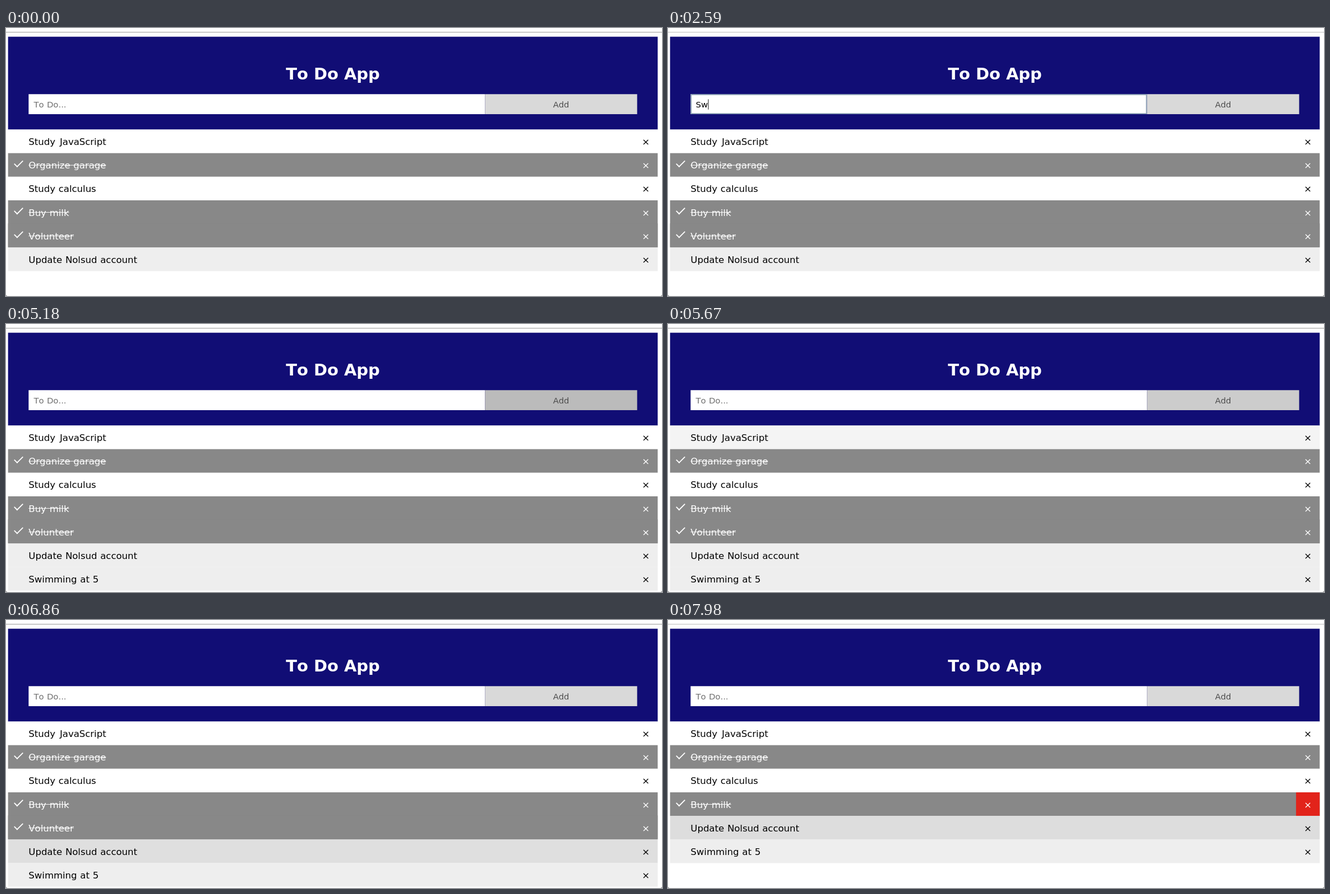
Animation of 1170 by 479 pixels, one loop 8 s. Source, as an HTML page:

```html
<!DOCTYPE html>
<html lang="en">
<head>
<meta charset="utf-8">
<title>To Do App</title>
<style>
  * { box-sizing: border-box; }
  html, body { margin: 0; width: 100%; height: 100%; overflow: hidden; background: #777; }
  #stage {
    position: relative; width: 1170px; height: 479px; overflow: hidden;
    background: #fff; border-radius: 0 0 3px 3px;
  }
  #rule { position: absolute; left: 0; top: 7px; width: 1170px; height: 1px; }
  /* the page is shown at 11/12 of its own size */
  #page {
    position: absolute; left: 0; top: 0; width: 1276px; height: 522px;
    transform: scale(.916667); transform-origin: 0 0;
    font: 18px "DejaVu Sans", Verdana, sans-serif;
    font-kerning: none; word-spacing: .034em; color: #000;
  }
  #page > *, #popup div { position: absolute; white-space: pre; }
  #head { left: 4px; top: 17px; width: 1264px; height: 181px; background: #110d75; }
  h1 {
    left: 4px; top: 67px; width: 1264px; margin: 0; word-spacing: 0;
    font-size: 31.6px; line-height: 44px; text-align: center; color: #fff;
  }
  #field, #add { top: 129px; height: 39px; font-size: 16.2px; line-height: 41px; }
  #field { left: 44px; width: 888px; padding-left: 10px; background: #fff; color: #707070; }
  #field.focus { box-shadow: inset 0 0 0 2px #8aa0b4; }
  #field.filled { color: #000; }
  #caret {
    display: none; position: absolute; top: 10px; width: 1px; height: 20px; background: #000;
  }
  .focus #caret { display: inline-block; }
  #add { left: 932px; width: 296px; font-size: 16px; text-align: center; color: #4d4d4d; }
  ul { left: 4px; top: 198px; width: 1264px; margin: 0; padding: 0; list-style: none; }
  li { position: relative; height: 46px; padding-left: 40px; line-height: 47px; }
  li i { font-style: normal; padding-left: .13em; }
  li.done { color: #fff; text-decoration: line-through; background: #888; }
  li.done + li.done { box-shadow: 0 -1px #888; }
  li.done::before {
    content: ""; position: absolute; left: 16px; top: 10px; width: 7px; height: 15px;
    border: solid #fff; border-width: 0 2px 2px 0; transform: rotate(45deg);
  }
  li b {
    position: absolute; right: 0; top: 0; width: 46px; height: 100%;
    font-weight: normal; text-align: center;
  }
  li b.hot { background: #e2231a; color: #fff; }
  #popup {
    left: 44px; top: 169px; width: 192px; height: 88px; background: #fff; border-radius: 3px;
    box-shadow: 0 1px 3px rgba(0, 0, 0, .4); font: 13px/22px Inter, sans-serif;
  }
  #popup div { left: 12px; }
</style>
</head>
<body>
<div id="stage">
  <div id="rule"></div>
  <div id="page">
    <div id="head"></div>
    <h1>To Do App</h1>
    <div id="field"><span id="typed"></span><span id="caret"></span></div>
    <div id="add">Add</div>
    <ul id="list"></ul>
    <div id="popup"><div style="top:15px">Blueee</div><div style="top:51px">scream</div></div>
  </div>
</div>
<script>
const LOOP = 8000, STEP = 70, FADE = 200;
const WHITE = 255, PALE = 238, HOVER = 221;
const FOCUS = 980, POPUP = 1260, SUBMIT = 5180, REMOVE = 7630, LEAVE = 7945;

const TEXT = 'Swimming at 5';
const KEYS = [2100, 2310, 2730, 2870, 3010, 3150, 3290, 3430, 3570, 3710, 3850, 4060, 4200];

// hover: spans under the pointer; hot: span over the close button
const items = [
  { text: 'Study <i>J</i>avaScript', base: WHITE, hover: [[5635, 5950]] },
  { text: 'Organize garage', done: true },
  { text: 'Study calculus', base: WHITE, hover: [[6370, 6580]] },
  { text: 'Buy milk', done: true, hot: [LEAVE, LOOP] },
  { text: 'Volunteer', done: true, hot: [7350, REMOVE], life: [0, REMOVE] },
  { text: 'Update Nolsud account', base: PALE, hover: [[6730, 7000], [REMOVE, LEAVE + 35]], hot: [REMOVE, LEAVE] },
  { text: TEXT, base: PALE, hover: [[7000, 7250]], life: [SUBMIT, LOOP] }
];

const $ = id => document.getElementById(id);
const within = (t, [a, b]) => t >= a && t < b;
const ease = ms => {
  const p = Math.min(1, Math.max(0, ms / FADE));
  return 1 - (1 - p) ** 2;
};
const level = (t, spans = []) =>
  spans.reduce((sum, [a, b]) => sum + ease(t - a) - ease(t - b), 0);
const grey = (from, to, k) => {
  const v = Math.round(from + (to - from) * k);
  return `rgb(${v},${v},${v})`;
};

for (const item of items) {
  item.row = document.createElement('li');
  item.row.innerHTML = item.text + '<b>×</b>';
  item.row.classList.toggle('done', !!item.done);
  item.close = item.row.querySelector('b');
  $('list').append(item.row);
}

function draw(t) {
  const count = t < SUBMIT ? KEYS.filter(k => k <= t).length : 0;
  const field = $('field');
  field.classList.toggle('focus', within(t, [FOCUS, SUBMIT]));
  field.classList.toggle('filled', count > 0);
  $('typed').textContent = count ? TEXT.slice(0, count) : 'To Do...';
  $('caret').style.left = count ? '' : '10px';
  $('popup').style.display = within(t, [POPUP, KEYS[0]]) ? '' : 'none';
  $('add').style.background = grey(217, 187, level(t, [[4900, 5600]]));
  $('rule').style.background = within(t, [1260, 5110]) || t >= 7560 ? '#bbb' : '#999';

  for (const { row, close, base, done, hover, hot, life } of items) {
    row.style.display = !life || within(t, life) ? '' : 'none';
    if (!done) row.style.background = grey(base, HOVER, level(t, hover));
    close.classList.toggle('hot', !!hot && within(t, hot));
  }
}

const start = performance.now();
function tick() {
  const t = (performance.now() - start) % LOOP;
  draw(Math.floor(t / STEP) * STEP);
  requestAnimationFrame(tick);
}
tick();
</script>
</body>
</html>
```
